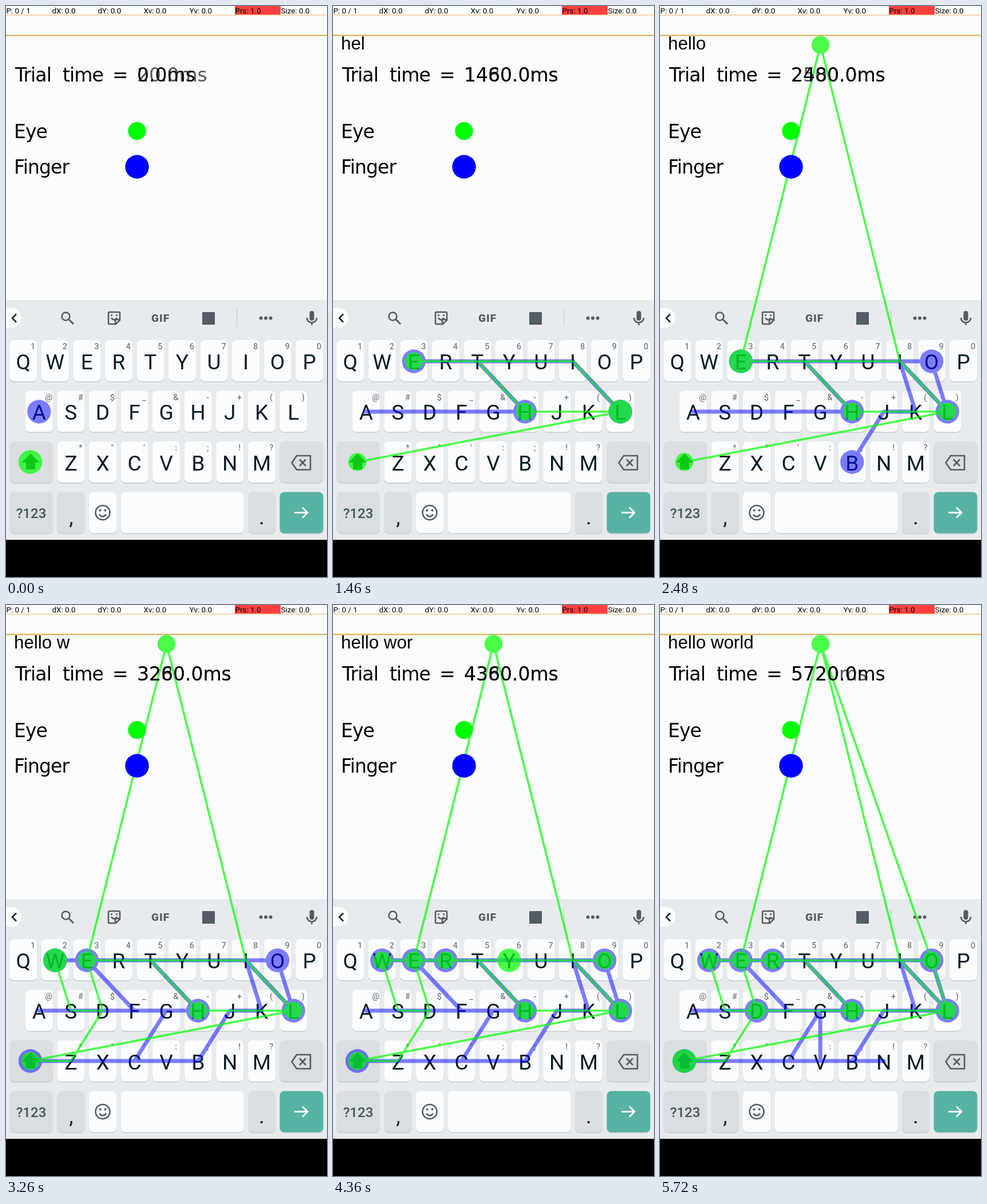
An HTML page that plays this animation: 561 px wide and 998 px high, repeating every 5740 ms.

```html
<!DOCTYPE html>
<html lang="en">
<head>
<meta charset="utf-8">
<title>Eye and finger typing</title>
<style>
  html, body { margin: 0; width: 100%; height: 100%; overflow: hidden; background: #fbfdfc; }
  svg { display: block; width: 100vw; height: 100vh; }
  .bar { font: 13.4px Roboto, sans-serif; }
  .typed { font: 31.3px "Liberation Sans", Arial, sans-serif; }
  .label { font: 33px "DejaVu Sans", sans-serif; letter-spacing: -.9px; }
  .num { letter-spacing: 0; }
  #keys { text-anchor: middle; font-family: Roboto, sans-serif; fill: #071d24; }
  .letter { font-size: 37px; }
  .hint { font-size: 14.5px; font-weight: 500; fill: #777c80; }
  .word { font-size: 24px; font-weight: 500; fill: #44565c; }
  .icon { fill: none; stroke: #535d62; stroke-width: 2.6; }
  .solid { fill: #535d62; }
  .trail polyline { fill: none; stroke-linejoin: round; stroke-linecap: round; }
</style>
</head>
<body>
<svg viewBox="0 0 561 998">
  <rect width="561" height="998" fill="#fbfdfc"/>
  <rect x="400" width="80" height="16" fill="#ff4040"/>
  <path d="M0 15.8H561" stroke="#f8c697" stroke-width="1.6"/>
  <path d="M0 51.5H561" stroke="#dca94a" stroke-width="2"/>
  <g id="bar" class="bar"></g>

  <rect y="514" width="561" height="419" fill="#e8ebed"/>
  <rect y="933" width="561" height="65" fill="#000"/>

  <path d="M0 528H10a17 17 0 0 1 0 34H0z" fill="#fcfdfd"/>
  <path class="icon" d="M18 538.500L11 545.500L18 552.500" style="stroke:#17282e"/>
  <g class="icon">
    <circle cx="104.500" cy="542.500" r="7"/>
    <path d="M109.500 547.500L118 556" stroke-width="3"/>
    <path d="M181 535H197a2 2 0 0 1 2 2V549L192 556H181a2 2 0 0 1-2-2V537a2 2 0 0 1 2-2zM199 548H191V556M184 545q5 7 10 0"/>
    <path d="M184.500 539v3M193.500 539v3"/>
    <path d="M403.500 530V560" stroke="#cbd0d2" stroke-width="1.5"/>
    <path d="M526 545a8.500 8.500 0 0 0 17 0M534.500 553v5"/>
  </g>
  <text class="solid" x="270" y="552" text-anchor="middle" font-family="Roboto, sans-serif" font-size="19" font-weight="900" letter-spacing="1">GIF</text>
  <rect class="solid" x="343" y="535" width="22" height="22"/>
  <g class="solid">
    <circle cx="445.500" cy="545.500" r="3"/><circle cx="454" cy="545.500" r="3"/><circle cx="462.500" cy="545.500" r="3"/>
    <rect x="530.500" y="533" width="8" height="17" rx="4"/>
  </g>

  <g id="keys"></g>
  <path d="M43 782L58.500 798H51V810H35V798H27.500z" fill="#34474d"/>
  <g class="icon">
    <path d="M508 786H532V810.500H508L499.500 798.200zM513 792.500L524 804M524 792.500L513 804"/>
    <circle cx="169" cy="885.500" r="12.500"/>
    <path d="M163 888.500q6 8 12 0"/>
  </g>
  <circle class="solid" cx="164.500" cy="881.500" r="2"/>
  <circle class="solid" cx="173.500" cy="881.500" r="2"/>
  <path d="M504 885.500H527M518 876.500L527 885.500L518 894.500" fill="none" stroke="#fff" stroke-width="2.8"/>

  <g id="finger" class="trail" opacity=".5" fill="#00f" stroke-width="7"></g>
  <g id="eye" class="trail" opacity=".7" fill="#0f0" stroke-width="3.7"></g>

  <text id="typed" class="typed" x="14" y="76" xml:space="preserve"></text>
  <g class="label">
    <text y="132"><tspan x="16">Trial</tspan><tspan x="99">time</tspan><tspan x="186">=</tspan></text>
    <text id="next" class="num" x="229" y="132" opacity=".65"></text>
    <text id="now" class="num" x="229" y="132"></text>
    <text x="14" y="231">Eye</text>
    <text x="14" y="293">Finger</text>
  </g>
  <circle cx="229" cy="218.500" r="15.700" fill="#0f0"/>
  <circle cx="229" cy="281" r="20.700" fill="#00f"/>
</svg>
<script>
const LOOP = 5740, STEP = 20, PITCH = 55.55;
const $ = id => document.getElementById(id);
const esc = s => s.replace('&', '&amp;');

// Points a trail can visit: letters, ^ for shift and ~ for the text field
const spots = { '^': [42.5, 797], '~': [280.500, 68] };

const key = (x, y, w, fill = '#fbfcfd') =>
  `<rect x="${x}" y="${y + 1.500}" width="${w}" height="72" rx="8" fill="#c6cacd"/>
   <rect x="${x}" y="${y}" width="${w}" height="72" rx="8" fill="${fill}"/>`;
const label = (kind, x, y, s) => `<text class="${kind}" x="${x}" y="${y}">${esc(s)}</text>`;

function drawKeyboard() {
  const rows = [
    [30.200, 584, 'QWERTYUIOP', '1234567890'],
    [57.800, 672.500, 'ASDFGHJKL', '@#$_&-+()'],
    [113.500, 761, 'ZXCVBNM', '*"\':;!?']
  ];
  const grey = '#dadee1';
  let out = '';
  rows.forEach(([x0, y, letters, hints], row) => [...letters].forEach((c, i) => {
    const x = x0 + i * PITCH;
    spots[c] = [x, 621 + row * 88];
    out += key(x - 24, y, 48) + label('letter', x, y + 50.500, c) + label('hint', x + 17, y + 16, hints[i]);
  }));
  out += key(6.500, 761, 75.500, grey) + key(478.500, 761, 76, grey)
    + key(6.500, 849.500, 75.500, grey) + key(89.500, 849.500, 48, grey)
    + key(145, 849.500, 48) + key(200.500, 849.500, 215)
    + key(423, 849.500, 48, grey) + key(478.500, 849.500, 76, '#57b3a3')
    + label('word', 44, 895, '?123') + label('letter', 114, 906, ',') + label('letter', 447, 906, '.');
  $('keys').innerHTML = out;
}

// Legs: start, end, spots passed. Capitals and symbols are taps or fixations.
const fingerLegs = [
  [40, 540, 'sdfgH'], [560, 800, 'trE'], [960, 1420, 'rtyuiL'], [1500, 1700, 'L'],
  [1860, 2100, 'O'], [2220, 2460, 'ikjb'], [2480, 2760, 'vcxz^'], [2800, 3220, 'zxcgfeW'],
  [3340, 3800, 'ertyuiO'], [3940, 4300, 'iuytR'], [4400, 4780, 'tyuiL'], [4900, 5480, 'kjbnbvgfD']
];
const eyeLegs = [
  [120, 240, 'l'], [260, 440, 'kjH'], [660, 800, 'trE'], [900, 1260, 'rtyuiL'],
  [1900, 2060, 'i~'], [2260, 2360, 'E'], [2500, 2680, 'dz^'], [2800, 3080, 'zdsW'],
  [3280, 3600, 'ertyuiO'], [3820, 4100, 'iuytR'], [4280, 4480, 'tyuiL'], [4660, 4800, 'o~'],
  [4920, 5040, 'iL'], [5060, 5280, 'kjhgfD'], [5540, 5660, 'z^']
];

const visited = (first, legs, t) => legs.reduce((path, [start, end, stops]) => {
  const p = Math.max(0, Math.min(1, (t - start) / (end - start)));
  return path + stops.slice(0, Math.floor(p * stops.length + 1e-6));
}, first);

const spot = c => spots[c.toUpperCase()];
const marks = path => [...path].filter(c => c === c.toUpperCase());
const dot = (c, r) => `<circle cx="${spot(c)[0]}" cy="${spot(c)[1]}" r="${r}"/>`;

function drawTrail(id, path, color, r) {
  const dots = [...new Set(marks(path))].map(c => dot(c, r)).join('');
  $(id).innerHTML = `<polyline points="${[...path].map(spot).join(' ')}" stroke="${color}"/>`
    + dots + dot(path.at(-1), 20.700);
}

function draw(t) {
  const finger = visited('a', fingerLegs, t);
  drawTrail('finger', finger, '#00f', 20.700);
  drawTrail('eye', visited('^', eyeLegs, t), '#0f0', 15.700);
  $('typed').textContent = marks(finger).join('').replace('^', ' ').toLowerCase();
  $('now').textContent = t + '.0ms';
  $('next').textContent = t + STEP < LOOP ? t + STEP + '.0ms' : t + 'ms';
}

drawKeyboard();
$('bar').innerHTML = ['P: 0 / 1', 'dX: 0.0', 'dY: 0.0', 'Xv: 0.0', 'Yv: 0.0', 'Prs: 1.0', 'Size: 0.0']
  .map((s, i) => `<text x="${i * 80 + .5}" y="13">${s}</text>`).join('');

const origin = performance.now();
function tick() {
  const t = (performance.now() - origin) % LOOP;
  draw(Math.floor(t / STEP) * STEP);
  requestAnimationFrame(tick);
}
tick();
</script>
</body>
</html>
```
